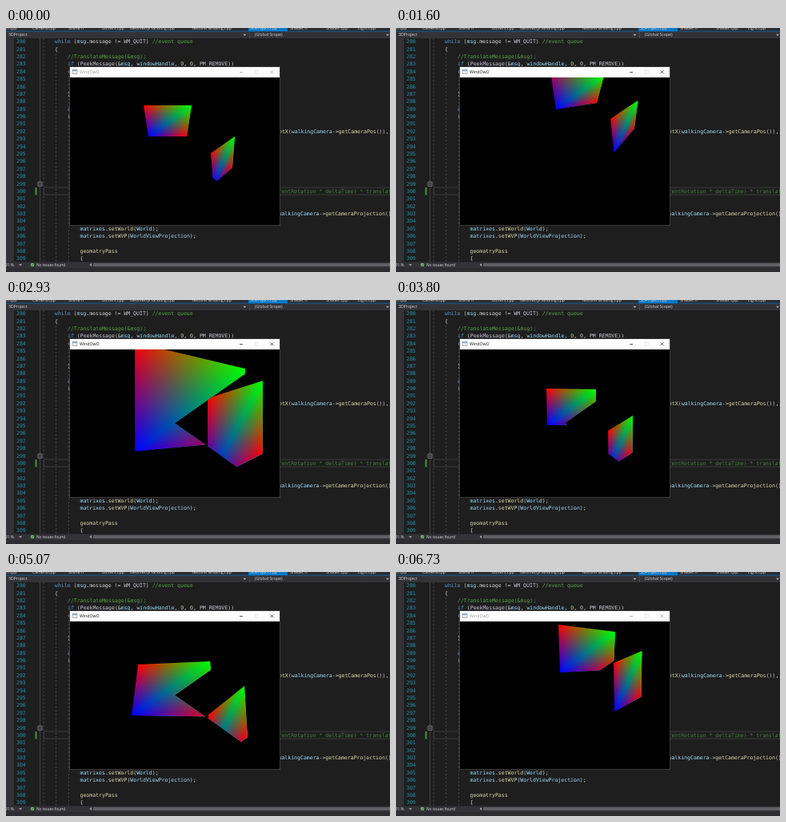
An HTML page with a canvas that plays this animation: 480x306 px, repeating every 6.87 s.

```html
<!DOCTYPE html>
<html lang="en">
<head>
<meta charset="utf-8">
<title>Window demo</title>
<style>
html, body { margin: 0; width: 100%; height: 100%; overflow: hidden; background: #1e1e1e; }
svg { position: absolute; left: 0; top: 0; }
canvas { position: absolute; left: 80px; top: 62px; width: 262px; height: 185px; }
.code { font: 6.53px "DejaVu Sans Mono", monospace; white-space: pre; }
.ui { font: 5.2px "Open Sans", sans-serif; fill: #d8d8d8; }
.small { font-size: 4.8px; }
.k { fill: #569cd6; }
.v { fill: #9cdcfe; }
.p { fill: #d4d4d4; }
.m { fill: #cfc8d8; }
.n { fill: #b5cea8; }
.c { fill: #57a64a; }
.f { fill: #dcdcaa; }
.d { fill: #478040; }
.l { fill: #2b91af; }
</style>
</head>
<body>
<svg width="480" height="306" viewBox="0 0 480 306">
  <rect width="480" height="306" fill="#1e1e1e"/>
  <rect y="13" width="10" height="281" fill="#333337"/>
  <g fill="none" stroke="#505050" stroke-width=".7">
    <path d="M42.5 13V294"/>
    <path d="M47 13V294M62.5 32V294M78.5 60V294" stroke-dasharray="2.5 2.2" stroke="#555"/>
    <rect x="47.5" y="200" width="440" height="9" stroke="#464646"/>
    <path d="M40 193.2h5v5h-5zM41 195.7h3" fill="#1e1e1e" stroke="#a5a5a5"/>
  </g>
  <rect x="36.5" y="200" width="2" height="9.4" fill="#4f8f40"/>
  <g id="code" class="code"></g>

  <rect width="480" height="13" fill="#2d2d30"/>
  <rect x="303" width="49" height="4" fill="#007acc"/>
  <rect y="3.7" width="480" height="1" fill="#0b6cae"/>
  <g id="tabs" class="ui"></g>
  <rect y="4.7" width="480" height="8.3" fill="#333337"/>
  <path d="M304.5 4.7V13" stroke="#48484c"/>
  <path d="M296.5 7.7h4l-2 2.2zM475 7.7h4l-2 2.2z" fill="#aaa"/>
  <text class="ui" x="3" y="10.4">3DProject</text>
  <text class="ui" x="311" y="10.4">(Global Scope)</text>

  <rect y="293.5" width="480" height="7.5" fill="#333337"/>
  <rect y="301" width="480" height="5" fill="#2d2d30"/>
  <rect x="109" y="295" width="371" height="4" fill="#5f5f64"/>
  <path d="M107 295v4l-2.5-2zM16 296.2h4l-2 2.2z" fill="#aaa"/>
  <text class="ui small" x="-1" y="299">91 %</text>
  <circle cx="33" cy="297" r="2.3" fill="#6fb56f"/>
  <path d="M31.9 297l.8.8 1.5-1.6" fill="none" stroke="#1e1e1e" stroke-width=".6"/>
  <text class="ui small" x="38" y="299">No issues found</text>

  <rect x="79.5" y="48.5" width="263" height="199" fill="#000" stroke="#3a3a3a"/>
  <rect x="80" y="49" width="262" height="13" fill="#fff"/>
  <rect x="83" y="52.5" width="6" height="5" fill="#e4e8ec" stroke="#8a8f96" stroke-width=".6"/>
  <path d="M83 53h6" stroke="#5d87b5"/>
  <text id="title" class="ui" x="92" y="57.3">WindOwO</text>
  <g fill="none" stroke-width=".7">
    <path d="M311.2 53.2h4v4h-4z" stroke="#ddd"/>
    <path id="buttons" d="M292 55.5h4M330.5 53.2l4 4m0-4l-4 4"/>
  </g>
</svg>
<canvas id="view" width="262" height="185"></canvas>
<script>
const NS = 'http://www.w3.org/2000/svg';
const $ = id => document.getElementById(id);

function addText(parent, x, y, spans) {
  const text = document.createElementNS(NS, 'text');
  text.setAttribute('x', x);
  text.setAttribute('y', y);
  for (const [cls, str] of spans) {
    const span = document.createElementNS(NS, 'tspan');
    span.setAttribute('class', cls);
    span.textContent = str;
    text.append(span);
  }
  parent.append(text);
}

// Code lines: number, x, then "class:text" pieces split by "|"
const lines = [
  [280, 61, 'k:while |p:(|v:msg|p:.message != |m:WM_QUIT|p:) |c://event queue'],
  [281, 61, 'p:{'],
  [282, 77, 'c://TranslateMessage(&msg);'],
  [283, 77, 'k:if |p:(|m:PeekMessage|p:(&|v:msg|p:, |v:windowHandle|p:, |n:0|p:, |n:0|p:, |m:PM_REMOVE|p:))'],
  [284, 77, 'p:{'],
  [287, 77, 'p:}'],
  [289, 77, 'k:else'],
  [290, 77, 'p:{'],
  [292, 341, 'f:etX|p:(|v:walkingCamera|p:->|f:getCameraPos|p:()),'],
  [300, 340.5, 'd:rentRotation * deltaTime) * translation'],
  [303, 340.5, 'v:walkingCamera|p:->|f:getCameraProjection|p:()'],
  [305, 92.5, 'v:matrixes|p:.|f:setWorld|p:(|v:World|p:);'],
  [306, 92.5, 'v:matrixes|p:.|f:setWVP|p:(|v:WorldViewProjection|p:);'],
  [308, 92.5, 'f:geomatryPass'],
  [309, 92.5, 'p:{']
];
const lineY = n => 19.3 + (n - 280) * 9.38;
for (let n = 280; n < 310; n++) addText($('code'), 13, lineY(n), [['l', n]]);
for (const [n, x, src] of lines) {
  addText($('code'), x, lineY(n), src.split('|').map(s => [s[0], s.slice(2)]));
}
[[0, 'h.cpp'], [33, 'Camera.cpp'], [78, 'Scene.h'], [120, 'Buffers.cpp'], [155, 'GeometryHandling.cpp'],
 [232, 'TextureHandling.cpp'], [305, '3DProject.cpp'], [355, 'Shader.h'], [400, 'Shader.cpp'], [440, 'Light.cpp']]
  .forEach(([x, name]) => addText($('tabs'), x, 1.7, [['p', name]]));

// Camera stops: time; shared width, taper and turn;
// big panel x, y, height; small panel x, y, height, slope
const stops = [
  [0, 60, 6, 0, 172, 97, 39, 256, 157, 39, -21],
  [1600, 69, 9, 20, 191, 40, 62, 268, 113, 43, -22],
  [2330, 111, 13, 22, 177, 38, 104, 261, 119, 80, -37],
  [2930, 138, 0, 33, 161, 53, 137, 252, 123, 105, -22],
  [3800, 62, 1, 1, 188, 111, 46, 265, 164, 47, -19],
  [5070, 90, -8, -4, 165, 116, 64, 253, 179, 63, -36],
  [6530, 71, 2, 9, 203, 66, 60, 272, 114, 61, -15]
];

function stopAt(t) {
  const next = stops.findIndex(s => s[0] > t);
  if (next < 0) return stops[stops.length - 1];
  const a = stops[next - 1], b = stops[next];
  const u = (t - a[0]) / (b[0] - a[0]);
  return a.map((v, i) => v + (b[i] - v) * u);
}

// Corners in the order red, green, red, blue
const quad = (x, y, w, h, taper, topSlope, baseSlope) => [
  [x, y], [x + w, y + topSlope],
  [x + w - taper, y + h + baseSlope], [x + taper, y + h]
];

const ctx = $('view').getContext('2d');
const RED = '#f00', GREEN = '#0f0', BLUE = '#00f';
const L = 80, T = 62, R = 342, B = 247;

// The view's diagonals bound the part that belongs to the small panel
const center = [(L + R) / 2, (T + B) / 2];
const rightPart = [center, [R, T], [R, B]];
const otherPart = [center, [R, T], [L, T], [L, B], [R, B]];

function fillAll(style, mode) {
  ctx.globalCompositeOperation = mode;
  ctx.fillStyle = style;
  ctx.fillRect(L, T, R - L, B - T);
}

function clipTo(points) {
  ctx.beginPath();
  points.forEach(p => ctx.lineTo(...p));
  ctx.closePath();
  ctx.clip();
}

// Adds one corner's colour, fading to black at the opposite edge
function addCorner(p, a, b, color) {
  const dx = b[0] - a[0], dy = b[1] - a[1];
  const s = ((p[0] - a[0]) * dx + (p[1] - a[1]) * dy) / (dx * dx + dy * dy);
  const g = ctx.createLinearGradient(p[0], p[1], a[0] + s * dx, a[1] + s * dy);
  g.addColorStop(0, color);
  g.addColorStop(1, '#000');
  fillAll(g, 'lighter');
}

function shade(red, green, blue) {
  fillAll('#000', 'source-over');
  addCorner(red, green, blue, RED);
  addCorner(green, blue, red, GREEN);
  addCorner(blue, red, green, BLUE);
}

function drawPanel(corners, part) {
  const [tl, tr, br, bl] = corners;
  ctx.save();
  clipTo(part);
  clipTo(corners);
  shade(tl, tr, bl);
  clipTo([tr, br, bl]);
  shade(br, tr, bl);
  ctx.restore();
}

function render(t) {
  const active = t >= 470 && t < 6700;
  $('title').style.fill = active ? '#111' : '#999';
  $('buttons').style.stroke = active ? '#111' : '#999';

  const [, w, taper, turn, x1, y1, h1, x2, y2, h2, slope] = stopAt(t);
  ctx.setTransform(1, 0, 0, 1, -L, -T);
  fillAll('#000', 'source-over');
  drawPanel(quad(x1, y1, w, h1, taper, turn, -0.4 * turn), otherPart);
  drawPanel(quad(x2, y2, w / 2, h2, taper / 2, slope, slope - 0.4 * turn), rightPart);
}

const LOOP = 6870, STEP = 200 / 3;
function tick() {
  const t = performance.now() % LOOP;
  render(Math.min(101, Math.floor((t + 4) / STEP)) * STEP);
  requestAnimationFrame(tick);
}
tick();
</script>
</body>
</html>
```
